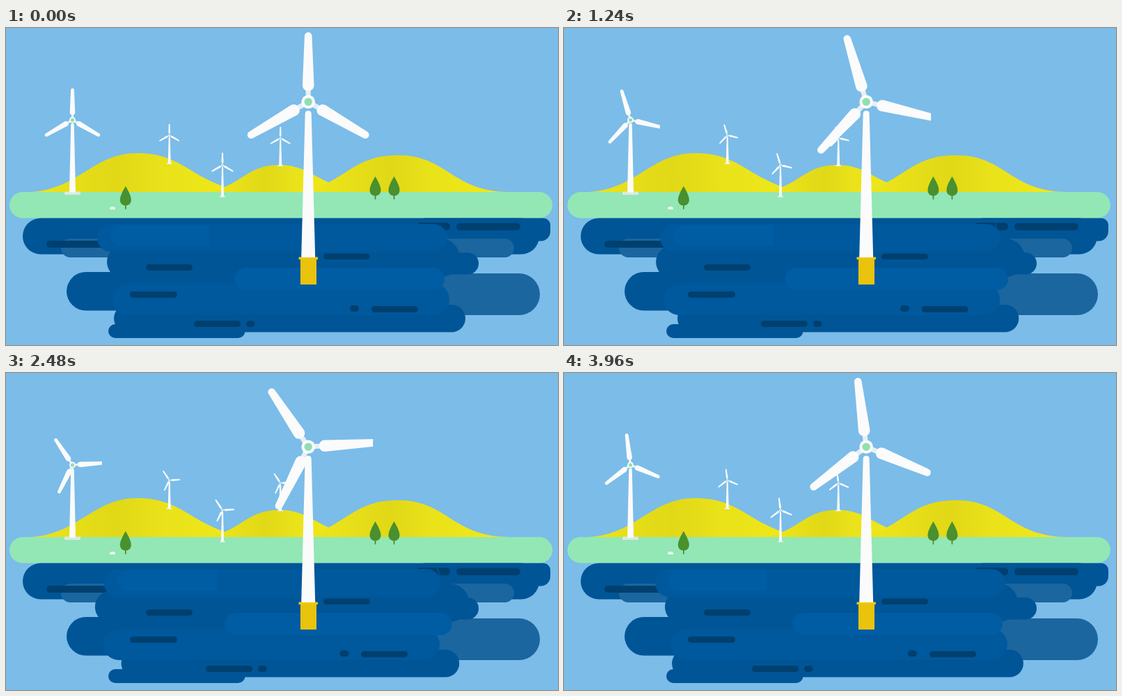
An HTML page with a canvas that plays this animation: 793 px wide and 456 px high, repeating every 4000 ms.

```html
<!DOCTYPE html>
<html lang="en">
<head>
<meta charset="utf-8">
<title>Wind farm</title>
<style>
html, body { margin: 0; width: 100%; height: 100%; overflow: hidden; background: #7bbce9; }
canvas { display: block; }
</style>
</head>
<body>
<canvas id="stage" width="793" height="456"></canvas>
<script>
const ctx = document.getElementById('stage').getContext('2d');
const LOOP = 4000, STEP = 40;
const SKY = '#7bbce9', LAND = '#92e7b5', WHITE = '#fbfbfb';
const DEEP = '#005596', MID = '#00589d', LIGHT = '#005ca3', PALE = '#1b669f', STRIPE = '#00406f';

function box(x1, y1, x2, y2, color, radius = (y2 - y1) / 2) {
  ctx.fillStyle = color;
  ctx.beginPath();
  ctx.roundRect(x1, y1, x2 - x1, y2 - y1, radius);
  ctx.fill();
}

function shape(path, color) {
  ctx.fillStyle = color;
  ctx.fill(new Path2D(path));
}

function disc(x, y, r, color) {
  ctx.fillStyle = color;
  ctx.beginPath();
  ctx.arc(x, y, r, 0, Math.PI * 2);
  ctx.fill();
}

function hill(path, left, right) {
  const shade = ctx.createLinearGradient(left, 0, right, 0);
  shade.addColorStop(0, '#ece41a');
  shade.addColorStop(0.4, '#e1d817');
  shade.addColorStop(0.65, '#eae21a');
  shade.addColorStop(1, '#efe81a');
  shape(path, shade);
}

function tree(x, top) {
  box(x - 0.8, top + 24, x + 0.8, top + 33, '#4f7c30', 0);
  shape(`M${x} ${top} C${x + 4} ${top + 7} ${x + 8} ${top + 14} ${x + 8} ${top + 20}
    C${x + 8} ${top + 25} ${x + 4} ${top + 28} ${x} ${top + 28}
    C${x - 4} ${top + 28} ${x - 8} ${top + 25} ${x - 8} ${top + 20}
    C${x - 8} ${top + 14} ${x - 4} ${top + 7} ${x} ${top}Z`, '#49902f');
}

function tower(x, top, bottom, topWidth, bottomWidth) {
  const a = topWidth / 2, b = bottomWidth / 2;
  shape(`M${x - b} ${bottom} L${x - a} ${top + a} Q${x - a} ${top} ${x} ${top}
    Q${x + a} ${top} ${x + a} ${top + a} L${x + b} ${bottom}Z`, WHITE);
}

function rotor(x, y, scale, angle) {
  ctx.save();
  ctx.translate(x, y);
  ctx.scale(scale, scale);
  ctx.beginPath();
  ctx.rect(-93, -101, 186, 202);
  ctx.clip();
  for (let i = 0; i < 3; i++) {
    ctx.save();
    ctx.rotate(angle + i * Math.PI * 2 / 3);
    box(-3.5, -19, 3.5, -7, '#e6eff5', 0);
    shape('M-5.3 -94.5 C-5.3 -102 5.3 -102 5.3 -94.5 L8.3 -24 C8.3 -13 -8.3 -13 -8.3 -24Z', WHITE);
    ctx.restore();
  }
  disc(0, 0, 9.8, WHITE);
  disc(0, 0, 5.7, '#8fe0b1');
  ctx.restore();
}

function drawLand() {
  hill('M35 236 C105 232 125 180 188 180 C258 180 265 222 345 236Z', 40, 330);
  hill('M290 236 C340 226 345 197 393 197 C430 197 440 215 495 236Z', 310, 470);
  hill('M430 236 C490 218 500 183 563 183 C635 183 640 236 725 236Z', 455, 700);
  box(5, 236, 785, 273.5, LAND);
  box(149, 257, 157, 261, '#f1f6f4', [4, 4, 1, 1]);
  tree(171.8, 227.5);
  tree(530.5, 213.5);
  tree(557.5, 213.5);
}

// p runs from 0 to 1 and back as the water drifts.
function drawWater(p) {
  box(24, 273.5, 766, 325.5, DEEP, 26);
  box(600, 273.5, 782, 306.5, DEEP, [0, 10, 14, 0]);
  box(79, 303, 300, 330, PALE);
  box(500, 303, 730, 330, PALE);
  box(58, 306, 200, 316, STRIPE);
  box(590, 280, 638, 291, STRIPE);
  ctx.strokeStyle = DEEP;
  ctx.lineWidth = 2 * p;
  ctx.beginPath();
  ctx.moveTo(619, 280);
  ctx.lineTo(623, 291);
  ctx.stroke();
  box(647, 280.5, 739, 291, STRIPE);

  box(560, 353, 767, 413, PALE);
  box(87, 351, 600, 406.5, DEEP);
  box(147, 426, 343.5, 446, DEEP);
  box(400, 323, 679, 354.5, DEEP);
  box(145 - 19.5 * p, 313, 630, 360, DEEP);
  box(300, 303, 652 + 15 * p, 358, DEEP);
  box(131 + 11 * p, 282, 634 - 11 * p, 322, MID);
  box(150 + 11 * p, 283, 292 + 13 * p, 314, LIGHT, [16, 0, 0, 16]);
  box(155 + 12 * p, 398, 660 - 10 * p, 437.5, DEEP);
  box(153 - 15 * p, 368, 637 - 16 * p, 413, MID);
  box(328 - 16 * p, 345, 630 + 12 * p, 377, LIGHT);

  box(201, 340, 268, 349, STRIPE);
  box(178, 379, 246, 388, STRIPE);
  box(456, 324.5, 523, 333, STRIPE);
  box(270 + 19.5 * p, 421, 337 + 19.5 * p, 430, STRIPE);
  box(345 + 19.5 * p, 421, 357.5 + 19.5 * p, 430, STRIPE);
  box(525 - 17 * p, 400, 592 - 17 * p, 409, STRIPE);
  box(494 - 16.5 * p, 399, 507 - 16.5 * p, 408, STRIPE);
}

function drawTurbines(angle) {
  box(84, 235.5, 107, 240, '#d9e9e6', 1);
  tower(95.5, 137, 236.5, 4.5, 9);
  rotor(95.5, 132.3, 0.455, angle);

  const small = [[234.7, 154.3, 0.165, 195], [311, 197.3, 0.18, 242.5], [394.2, 158.3, 0.165, 198]];
  for (const [x, y, scale, foot] of small) {
    box(x - 4, foot - 1, x + 4, foot + 1, '#e3eeea', 1);
    tower(x, y + 2, foot, 2, 4);
    rotor(x, y, scale, angle);
  }

  box(423, 332, 446, 369, '#e9c30c', 0);
  box(420.5, 329.5, 448, 333, '#edc80d', 0.5);
  tower(434.2, 119, 330, 9, 20);
  rotor(434.2, 106.3, 1, angle);
}

function draw(time) {
  const t = Math.floor(time % LOOP / STEP) * STEP;
  const drift = (1 - Math.cos((t - 30) / LOOP * Math.PI * 2)) / 2;
  ctx.fillStyle = SKY;
  ctx.fillRect(0, 0, 793, 456);
  drawLand();
  drawWater(drift);
  drawTurbines(t / 2000 * Math.PI * 2);
}

const start = performance.now();
function tick() {
  draw(performance.now() - start);
  requestAnimationFrame(tick);
}
tick();
</script>
</body>
</html>
```
